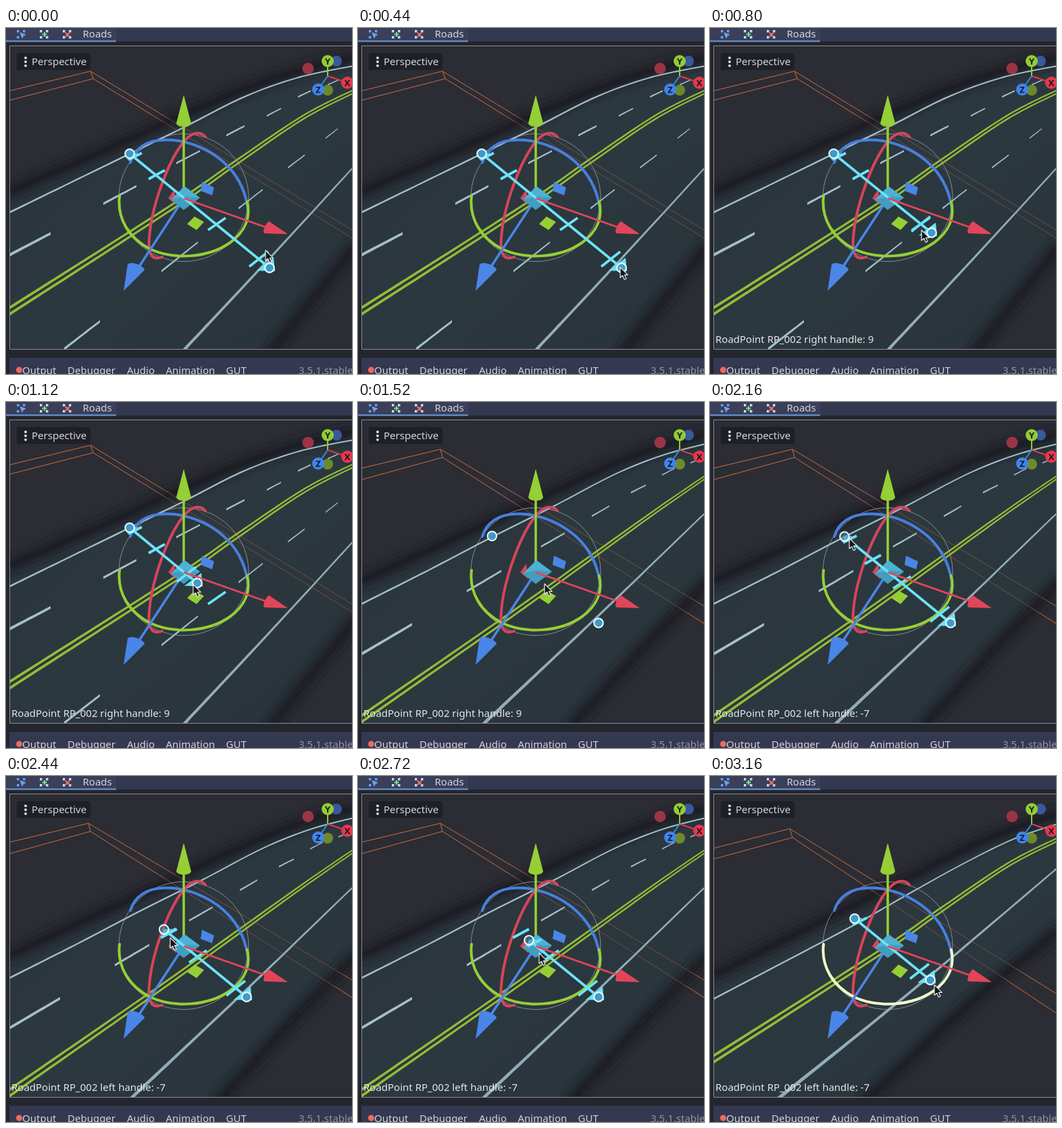
An HTML page that plays this animation: 512x512 px, repeating every 3200 ms.

```html
<!DOCTYPE html>
<html lang="en">
<head>
<meta charset="utf-8">
<title>Road handles</title>
<style>
html, body { margin: 0; width: 100%; height: 100%; overflow: hidden; background: #24262e; }
svg { display: block; width: 100vw; height: 100vh; }
text { font: 15px "Noto Sans", "Open Sans", sans-serif; fill: #d3d5da; }
.nav { font-size: 13px; font-weight: 600; fill: #17181c; text-anchor: middle; }
.ring { fill: none; stroke-width: 4; stroke-linecap: round; }
.wire { fill: none; stroke: #b4633b; stroke-width: 1; }
</style>
</head>
<body>
<svg viewBox="0 0 512 512" preserveAspectRatio="none">
  <defs>
    <clipPath id="view"><rect x="6" y="27" width="506" height="448"/></clipPath>
    <filter id="soft" x="-20%" y="-20%" width="140%" height="140%"><feGaussianBlur stdDeviation="7"/></filter>
    <linearGradient id="asphalt" x1="0" y1="0" x2="1" y2="1">
      <stop offset="0" stop-color="#29323a"/><stop offset=".5" stop-color="#2c383f"/><stop offset="1" stop-color="#283239"/>
    </linearGradient>
  </defs>

  <rect width="512" height="512" fill="#24262e"/>
  <rect width="512" height="20" fill="#343850"/>
  <rect width="163" height="20" fill="#3a3f5a"/>
  <rect y="18.5" width="163" height="2" fill="#6d9bd8"/>
  <g id="tools"></g>
  <text x="113.5" y="13.5">Roads</text>

  <rect x="6" y="27" width="506" height="448" fill="#2b2c34"/>
  <g id="roads" clip-path="url(#view)"></g>
  <path d="M514 26.5H5.5V475.5H514" fill="none" stroke="#8a8d98"/>

  <rect x="16" y="37" width="109" height="25" rx="3" fill="#1b1c22" opacity=".75"/>
  <g fill="#e6e7ea"><circle cx="29" cy="44.2" r="1.9"/><circle cx="29" cy="50" r="1.9"/><circle cx="29" cy="55.8" r="1.9"/></g>
  <text x="38" y="55">Perspective</text>

  <g stroke-width="2">
    <circle cx="447" cy="60" r="8.5" fill="#9c3445"/>
    <circle cx="489" cy="49" r="8" fill="#39599a"/>
    <circle cx="476" cy="92" r="8" fill="#6c8a2c"/>
    <path d="M476 71V50" stroke="#8fd02f"/><path d="M476 71L505 81" stroke="#e5384f"/><path d="M476 71L462 91" stroke="#3f85ee"/>
    <circle cx="476" cy="49" r="9" fill="#90cc35"/>
    <circle cx="505" cy="81" r="9" fill="#e5384f"/>
    <circle cx="462" cy="91" r="9" fill="#3f85ee"/>
  </g>
  <text class="nav" x="476" y="53.7">Y</text>
  <text class="nav" x="505" y="85.7">X</text>
  <text class="nav" x="462" y="95.7">Z</text>

  <ellipse cx="263" cy="251" rx="96" ry="94.5" fill="none" stroke="#a7a9ad" stroke-opacity=".75"/>
  <path id="blue" class="ring" d="M184 199C190 178 208 166 236 165.500C276 165 318 187 340 219C354 240 362 270 356 286"/>
  <path d="M357 283Q353 296 344 304" fill="none" stroke="#4a83e0" stroke-width="2" opacity=".45"/>
  <path id="red" class="ring" d="M295 161C288 153 277 153 265 166C240 194 215 266 212 310C210 333 215 345 231 339"/>
  <path id="green" class="ring" d="M168 249C164 282 182 311 213 327C247 343 298 341 331 318C355 301 362 279 357 257"/>

  <path d="M263 250V143" stroke="#95cf36" stroke-width="3.6"/>
  <path d="M263 99L274 141Q273 146 263 146Q253 146 252 141Z" fill="#95cf36"/>
  <path d="M263 252L197 353" stroke="#4a86e8" stroke-width="3.6"/>
  <path d="M174 389L180 350Q183 346 193 349Q204 353 205 358Z" fill="#4a86e8"/>
  <path d="M290 227.500L308 236L305 247.500L288 241Z" fill="#4a86e8"/>
  <path d="M240 252L249 239L252 262Z" fill="#d84556"/>
  <path d="M264 234L287 251L263 269L244 254Z" fill="#4fb1d2"/>
  <path d="M244 254L264 249L287 251L263 269Z" fill="#439dbf"/>
  <g id="lines" fill="none" stroke="#6ce3f7" stroke-width="3.8"></g>
  <path d="M263 252L385 295" stroke="#e24559" stroke-width="2.8"/>
  <path d="M417 305L389 286Q383 290 381 301Q381 304 384 304Z" fill="#e24559"/>
  <path d="M268 290L279 279L293 287L282 299Z" fill="#95cf36"/>
  <g id="dots" stroke="#f4fafc" stroke-width="2"><circle r="6.800"/><circle r="6.800"/></g>
  <text id="status" x="8" y="466" style="fill:#e6e7ea"></text>
  <path id="cursor" d="M0 0V15.500L3.600 12.300L6.200 18.200L9 17L6.400 11.300H11.300Z" fill="#15161a" stroke="#e4e6ea" stroke-width="1.200" stroke-linejoin="round"/>

  <rect y="488" width="512" height="24" fill="#343850"/>
  <rect x="0" y="488" width="5" height="24" fill="#24262e"/>
  <circle cx="19.500" cy="506" r="4.500" fill="#ee6a62"/>
  <text x="24" y="511.500">Output</text>
  <text x="91" y="511.500">Debugger</text>
  <text x="179" y="511.500">Audio</text>
  <text x="236.500" y="511.500">Animation</text>
  <text x="325.500" y="511.500">GUT</text>
  <text x="433" y="511.500" style="fill:#92959f">3.5.1.stable</text>
</svg>
<script>
const $ = id => document.getElementById(id);

// Smooth curve through points.
function curve(p, start = 'M') {
  let d = start + p[0];
  for (let i = 0; i < p.length - 1; i++) {
    const a = p[i - 1] || p[i], b = p[i], c = p[i + 1], e = p[i + 2] || c;
    d += `C${b[0] + (c[0] - a[0]) / 6},${b[1] + (c[1] - a[1]) / 6} ${c[0] - (e[0] - b[0]) / 6},${c[1] - (e[1] - b[1]) / 6} ${c}`;
  }
  return d;
}

// Painted line that narrows with distance.
function stripe(p, near, far, color, shiftNear = 0, shiftFar = 0) {
  const x0 = p[0][0], span = p[p.length - 1][0] - x0;
  const edge = s => p.map(([x, y]) => {
    const k = (x - x0) / span, mix = (a, b) => a + (b - a) * k;
    return [x, y + mix(shiftNear, shiftFar) + s * mix(near, far) / 2];
  });
  return `<path d="${curve(edge(-1))}${curve(edge(1).reverse(), 'L')}Z" fill="${color}"/>`;
}

const paint = '#a5c0ca';
const dash = ([x1, y1, x2, y2]) => stripe([[x1, y1], [x2, y2]], 4.4 - x1 / 190, 4.2 - x2 / 190, paint);
const yellowA = [[5, 419], [250, 262], [345, 196], [440, 132], [514, 94]];

const roads = [
  {
    until: 1200,
    top: [[0, 245], [150, 180], [260, 130], [350, 92], [430, 65], [520, 43]],
    low: [[390, 482], [450, 405], [520, 318]],
    left: [[5, 273], [130, 212], [263, 147], [350, 103], [430, 74], [514, 56]],
    right: [[262, 478], [390, 341], [514, 206]],
    yellow: yellowA,
    dashes: [[5, 336, 66, 304], [144, 260, 193, 234], [252, 200, 287, 182], [326, 159, 353, 145],
      [386, 130, 407, 119], [432, 102, 451, 93], [476, 84, 492, 77],
      [86, 475, 139, 434], [230, 360, 284, 317], [344, 267, 380, 239], [417, 207, 442, 188], [473, 163, 491, 149]],
    wire: [[93, 125, 64, 300], [107, 129, 75, 312]],
    ticks: [[223, 217], [312, 290]]
  },
  {
    until: 2760,
    top: [[0, 268], [180, 185], [290, 133], [380, 92], [450, 66], [520, 48]],
    low: [[314, 482], [420, 365], [520, 262]],
    left: [[5, 299], [110, 246], [198, 200], [290, 154], [380, 107], [450, 79], [514, 62]],
    right: [[184, 478], [356, 316], [514, 164]],
    yellow: [[5, 469], [215, 323], [345, 230], [440, 162], [514, 111]],
    dashes: [[5, 373, 80, 329], [161, 280, 212, 250], [271, 214, 306, 194], [346, 169, 372, 154],
      [404, 134, 426, 123], [450, 108, 469, 98], [492, 90, 506, 85]],
    wire: [[98, 122, 70, 303], [115, 125, 82, 329]],
    ticks: [[241, 233], [284, 267]]
  },
  {
    until: 3200,
    top: [[0, 298], [180, 208], [300, 148], [400, 98], [460, 75], [520, 55]],
    low: [[228, 482], [380, 340], [520, 224]],
    left: [[5, 330], [110, 275], [214, 220], [300, 171], [380, 127], [450, 93], [514, 71]],
    right: [[100, 478], [220, 382], [325, 296], [420, 216], [514, 136]],
    yellow: yellowA,
    dashes: [],
    wire: [[107, 118, 78, 323], [123, 122, 91, 352]],
    ticks: []
  }
];

$('roads').innerHTML = roads.map(r => {
  const [a, b] = r.wire;
  const wires = r.wire.map(([y0, x, y, y1]) => `M5 ${y0}L${x} ${y}L514 ${y1}`).join('') + `M${a[1]} ${a[2]}L${b[1]} ${b[2]}`;
  const band = p => `<path d="${curve(p)}" fill="none" stroke="#1b1d23" stroke-width="17" filter="url(#soft)"/>`;
  return `<g><path class="wire" d="${wires}"/>
    <path d="${curve(r.top)}${curve([...r.low].reverse(), 'L')}L0,482Z" fill="url(#asphalt)"/>
    ${band(r.top)}${band(r.low)}
    ${stripe(r.left, 2.8, 2, paint)}${r.dashes.map(dash).join('')}
    ${stripe(r.yellow, 4.6, 2.3, '#94bd36', -4.8, -2.3)}${stripe(r.yellow, 4.6, 2.3, '#94bd36', 4.8, 2.3)}
    ${stripe(r.right, 6.4, 3, '#92adb9')}
    <path class="wire" d="${wires}" opacity=".55"/></g>`;
}).join('');
const roadEls = [...$('roads').children];

// Toolbar icons: node corners plus a mark.
const marks = ['M21 7L29 10L25.500 11.500L24 15Z', 'M57 6V13M53.500 9.500H60.500', 'M88 7L94 13M94 7L88 13'];
$('tools').innerHTML = ['#6ea3e8', '#6fe08f', '#f0716c'].map((c, i) => {
  const x = 16 + 34 * i, fill = i ? '#d5d8df' : c;
  const nodes = [[0, 3], [9, 3], [0, 12], [9, 12]].slice(0, i ? 4 : 3)
    .map(([dx, y]) => `<rect x="${x + dx}" y="${y}" width="3.500" height="3.500" fill="${fill}"/>`).join('');
  return nodes + `<path d="${marks[i]}" fill="${i ? 'none' : c}" stroke="${c}" stroke-width="${i ? 2.2 : 1}"/>`;
}).join('');

const tracks = {
  cursor: [[0, 384, 329], [200, 389, 343], [400, 388, 354], [560, 388, 354], [680, 349, 328], [800, 313, 299],
    [960, 289, 280], [1120, 277, 270], [1480, 277, 270], [1520, 276, 269], [1760, 236, 231], [2040, 201, 196],
    [2120, 201, 196], [2360, 232, 229], [2600, 265, 260], [2720, 268, 262], [2880, 268, 262], [3040, 307, 292], [3160, 332, 309]],
  left: [[0, 183, 186], [1199, 183, 186], [1200, 198, 198], [2160, 199, 199], [2360, 225, 220], [2600, 251, 241],
    [2720, 253, 243], [2759, 253, 243], [2760, 214, 211]],
  right: [[0, 390, 355], [560, 390, 355], [680, 360, 330], [800, 328, 303], [960, 299, 280], [1120, 283, 268],
    [1199, 283, 268], [1200, 356, 327], [2759, 356, 327], [2760, 326, 302]]
};

function at(track, t) {
  const i = track.findIndex(k => k[0] > t);
  if (i < 0) return track[track.length - 1].slice(1);
  const a = track[i - 1], b = track[i], k = (t - a[0]) / (b[0] - a[0]);
  return [a[1] + (b[1] - a[1]) * k, a[2] + (b[2] - a[2]) * k];
}

const within = (t, a, b) => t >= a && t < b;
const tick = ([x, y], w = 12, h = 8) => `M${x - w} ${y + h}L${x + w} ${y - h}`;

function linePath(l, r, ticks) {
  const small = tick([l[0] + 8, l[1] + 4], 10, 5);
  return `<path d="M${l}L${r}${small}${ticks.map(p => tick(p, p[0] < 263 ? 12 : 13, p[0] < 263 ? 6.5 : 9)).join('')}${tick([r[0] - 16, r[1] - 13], 14, 11)}"/>
    <path d="M${r[0] - 19} ${r[1] + 4}L${r[0] + 6} ${r[1] - 15}L${r[0] + 8} ${r[1] + 5}Z" fill="#6ce3f7" stroke="none"/>
    <path d="M${l[0] - 4} ${l[1] + 9}L${l[0] + 12} ${l[1] - 1}L${l[0]} ${l[1]}Z" fill="#6ce3f7" stroke="none"/>`;
}

const [dotL, dotR] = $('dots').children;
function place(dot, [x, y], fill) {
  dot.setAttribute('cx', x);
  dot.setAttribute('cy', y);
  dot.setAttribute('fill', fill);
}

function draw(now) {
  const t = Math.floor((now % 3200) / 40) * 40;
  const n = roads.findIndex(r => t < r.until);
  roadEls.forEach((g, i) => g.style.display = i === n ? '' : 'none');

  const l = at(tracks.left, t), r = at(tracks.right, t);
  const lined = !within(t, 1200, 1720) && !within(t, 2760, 2920);
  $('lines').innerHTML = lined ? linePath(l, r, roads[n].ticks) : '';
  place(dotL, l, within(t, 2080, 2760) ? 'rgba(64,140,175,.55)' : '#3b9ccb');
  place(dotR, r, '#3b9ccb');

  $('red').style.stroke = within(t, 1720, 1840) ? '#ffd3d6' : '#d8445a';
  $('blue').style.stroke = within(t, 1960, 2080) || within(t, 3080, 3160) ? '#d3e4ff' : '#4780e0';
  $('green').style.stroke = t >= 3160 ? '#f1fac8' : '#95cf36';

  $('status').textContent = t < 560 ? '' : 'RoadPoint RP_002 ' + (t < 2080 ? 'right handle: 9' : 'left handle: -7');
  $('cursor').setAttribute('transform', `translate(${at(tracks.cursor, t)})`);
}

const begin = performance.now();
function frame() {
  draw(performance.now() - begin);
  requestAnimationFrame(frame);
}
frame();
</script>
</body>
</html>
```
